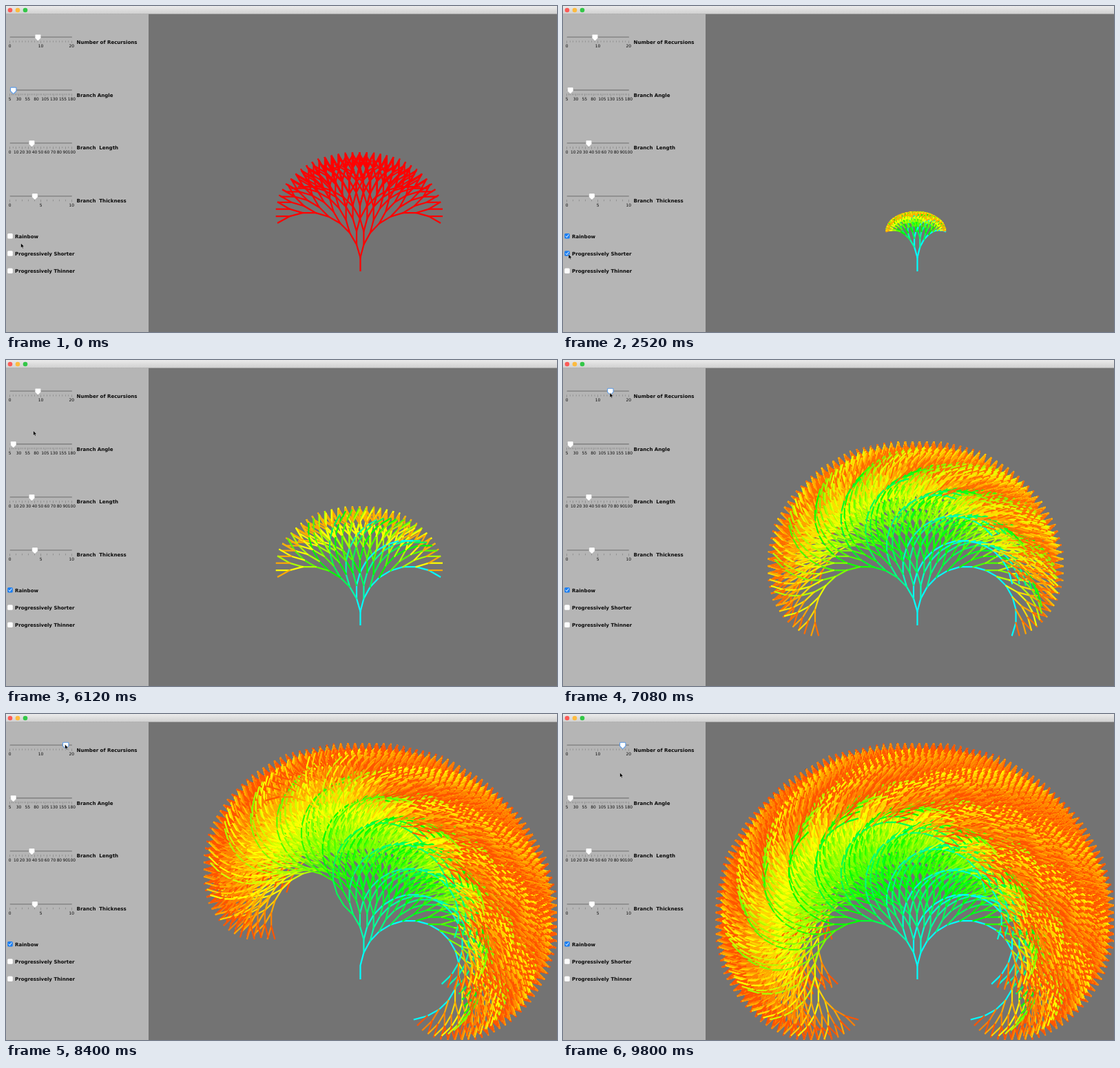
These frames come from a looping animation (800 by 473 pixels, 9840 ms). An HTML page with a canvas:

```html
<!DOCTYPE html>
<html lang="en">
<head>
<meta charset="utf-8">
<title>Fractal tree</title>
<style>
html, body { margin: 0; width: 100%; height: 100%; overflow: hidden; background: #737373; }
canvas, svg { position: absolute; left: 0; top: 0; width: 800px; height: 473px; }
text { font-family: "DejaVu Sans", sans-serif; fill: #0a0a0a; }
.name { font-weight: bold; font-size: 7.05px; white-space: pre; }
.num { font-size: 5.9px; text-anchor: middle; }
</style>
</head>
<body>
<canvas id="tree" width="800" height="473"></canvas>
<svg id="ui" viewBox="0 0 800 473">
  <defs>
    <linearGradient id="bar" x2="0" y2="1">
      <stop offset="0" stop-color="#ebebeb"/><stop offset="1" stop-color="#d0d0d0"/>
    </linearGradient>
  </defs>
  <rect y="11" width="207" height="462" fill="#b5b5b5"/>
  <rect width="800" height="11.5" fill="url(#bar)"/>
  <rect y="11.2" width="800" height=".6" fill="#a9a9a9"/>
  <circle cx="6" cy="6" r="3.3" fill="#fc5b57"/>
  <circle cx="17" cy="6" r="3.3" fill="#fdbb3f"/>
  <circle cx="28" cy="6" r="3.3" fill="#33c748"/>
</svg>
<script>
const LOOP = 9840, SCALE = 0.548, ROOT_X = 939, ROOT_Y = 701;
const LENGTH = 35, TURN = 15, THICK = 4;
const LINES_PER_MS = 2 ** 18 / 1200;

const ui = document.getElementById('ui');
const ctx = document.getElementById('tree').getContext('2d');

function add(tag, attrs, parent = ui) {
  const el = document.createElementNS('http://www.w3.org/2000/svg', tag);
  for (const k in attrs) el.setAttribute(k, attrs[k]);
  parent.appendChild(el);
  return el;
}
function label(cls, x, y, str) {
  add('text', { class: cls, x, y }).textContent = str;
}

// ---- controls ----
function slider(y, name, min, max, minor, major, value) {
  const pos = v => 5.7 + 89.6 * (v - min) / (max - min);
  add('rect', { x: 5.5, y: y - 0.9, width: 90.5, height: 1.8, rx: 0.9, fill: '#8c8c8c' });
  for (let v = min; v <= max; v += minor) {
    const big = (v - min) % major === 0;
    add('rect', { x: pos(v) - 0.25, y: y + 5.1, width: 0.5, height: big ? 3.6 : 2.4, fill: '#6f6f6f' });
    if (big) label('num', pos(v), y + 15.1, v);
  }
  label('name', 102.6, y + 9.5, name);
  const knob = add('path', {
    d: 'M-3.2-3.9H3.2Q4.2-3.9 4.2-2.9V1.4L.6 5Q0 5.5-.6 5L-4.2 1.4V-2.9Q-4.2-3.9-3.2-3.9Z',
    fill: '#fff'
  });
  return (focus, v = value) => {
    knob.setAttribute('transform', `translate(${pos(v) + 0.4} ${y})`);
    knob.setAttribute('stroke', focus ? '#5d9be6' : '#a2a2a2');
    knob.setAttribute('stroke-width', focus ? 1.1 : 0.4);
  };
}

function checkbox(y, name) {
  const box = add('rect', { x: 2.2, y: y - 3.8, width: 7.6, height: 7.6, rx: 1.6 });
  const tick = add('path', {
    d: `M4.1 ${y + 0.2}L5.5 ${y + 1.9}L8 ${y - 2}`,
    fill: 'none', stroke: '#fff', 'stroke-width': 1, 'stroke-linecap': 'round'
  });
  label('name', 13, y + 2.7, name);
  return on => {
    box.setAttribute('fill', on ? '#1c7ff2' : '#fdfdfd');
    tick.setAttribute('visibility', on ? 'visible' : 'hidden');
  };
}

const setDepth = slider(45.2, 'Number of Recursions', 0, 20, 1, 10, 9);
const setAngle = slider(122, 'Branch Angle', 5, 180, 5, 25, 14);
const setLength = slider(198.9, 'Branch  Length', 0, 100, 5, 10, 35);
const setThick = slider(275.8, 'Branch  Thickness', 0, 10, 1, 5, 4);
const setRainbow = checkbox(333.8, 'Rainbow');
const setShorter = checkbox(359, 'Progressively Shorter');
const setThinner = checkbox(384.2, 'Progressively Thinner');
const cursor = add('path', {
  d: 'M0 0V7L1.6 5.6L2.7 8L3.9 7.5L2.8 5.2H5Z',
  fill: '#000', stroke: '#e8e8e8', 'stroke-width': 0.5
});

// ---- timeline ----
const scenes = [];
function scene(start, change) {
  scenes.push({ ...scenes[scenes.length - 1], ...change, start });
}
scene(-1000, { depth: 9, rainbow: false, shorter: false, thinner: false, focus: 'angle' });
scene(800, { rainbow: true, focus: '' });
scene(1900, { shorter: true });
scene(3000, { shorter: false });
scene(4040, { thinner: true });
scene(5500, { thinner: false });
scene(6340, { focus: 'depth' });
scene(6420, { depth: 10 });
scene(6520, { depth: 11 });
scene(6620, { depth: 12 });
scene(6720, { depth: 13 });
scene(6840, { depth: 14 });
scene(7300, { depth: 15 });
scene(7480, { depth: 16 });
scene(7836, { depth: 18 });

const path = [
  [0, 21.5, 344], [650, 7, 334], [1150, 7, 334], [1700, 8, 360], [3150, 8, 360],
  [3800, 7, 388.5], [5600, 7, 388.5], [6300, 46, 47], [6840, 68, 47.5],
  [7150, 68, 47.5], [7700, 85.5, 44], [9150, 85.5, 44], [9700, 82.5, 85], [LOOP, 82.5, 85]
];
function cursorAt(t) {
  const i = Math.max(1, path.findIndex(p => p[0] > t));
  const [t0, x0, y0] = path[i - 1], [t1, x1, y1] = path[i];
  const u = (t - t0) / (t1 - t0), e = u * u * (3 - 2 * u);
  return [x0 + (x1 - x0) * e, y0 + (y1 - y0) * e];
}

// ---- tree ----
const rad = Math.PI / 180;
let current = null, stack = [], drawn = 0;

function clearTree(s) {
  current = s;
  drawn = 0;
  stack = [[ROOT_X, ROOT_Y, -90, s.depth, 0]];
  ctx.setTransform(1, 0, 0, 1, 0, 0);
  ctx.fillStyle = '#737373';
  ctx.fillRect(0, 0, 800, 473);
  ctx.setTransform(SCALE, 0, 0, SCALE, 514.5 - ROOT_X * SCALE, 384 - ROOT_Y * SCALE);
  ctx.lineCap = 'square';
  ctx.lineJoin = 'miter';
}

// Right turns keep the pen; each left turn picks a new one from the depth left.
function drawRun(s) {
  let [x, y, angle, left, pen] = stack.pop();
  ctx.strokeStyle = s.rainbow ? `hsl(${180 * (pen || s.depth) / s.depth},100%,50%)` : '#f00';
  ctx.lineWidth = s.thinner && pen ? 0.9 * pen : THICK;
  ctx.beginPath();
  ctx.moveTo(x, y);
  for (; left > 0; left--, angle += TURN) {
    const len = LENGTH * (s.shorter ? 0.8 ** (s.depth - left) : 1);
    x = Math.floor(x + len * Math.cos(angle * rad));
    y = Math.floor(y + len * Math.sin(angle * rad));
    ctx.lineTo(x, y);
    drawn++;
    if (left > 1) stack.push([x, y, angle - TURN, left - 1, left]);
  }
  ctx.stroke();
}

function drawTree(s, t) {
  const goal = (t - s.start) * LINES_PER_MS;
  if (s !== current || drawn > goal + 20) clearTree(s);
  while (stack.length && drawn < goal) drawRun(s);
}

// ---- playback ----
function render(t) {
  const s = scenes.filter(c => c.start <= t).pop();
  setDepth(s.focus === 'depth', s.depth);
  setAngle(s.focus === 'angle');
  setLength(false);
  setThick(false);
  setRainbow(s.rainbow);
  setShorter(s.shorter);
  setThinner(s.thinner);
  cursor.setAttribute('transform', `translate(${cursorAt(t)})`);
  drawTree(s, t);
}

const begin = performance.now();
function frame(now) {
  render(Math.max(0, now - begin) % LOOP);
  requestAnimationFrame(frame);
}
render(0);
requestAnimationFrame(frame);
</script>
</body>
</html>
```
